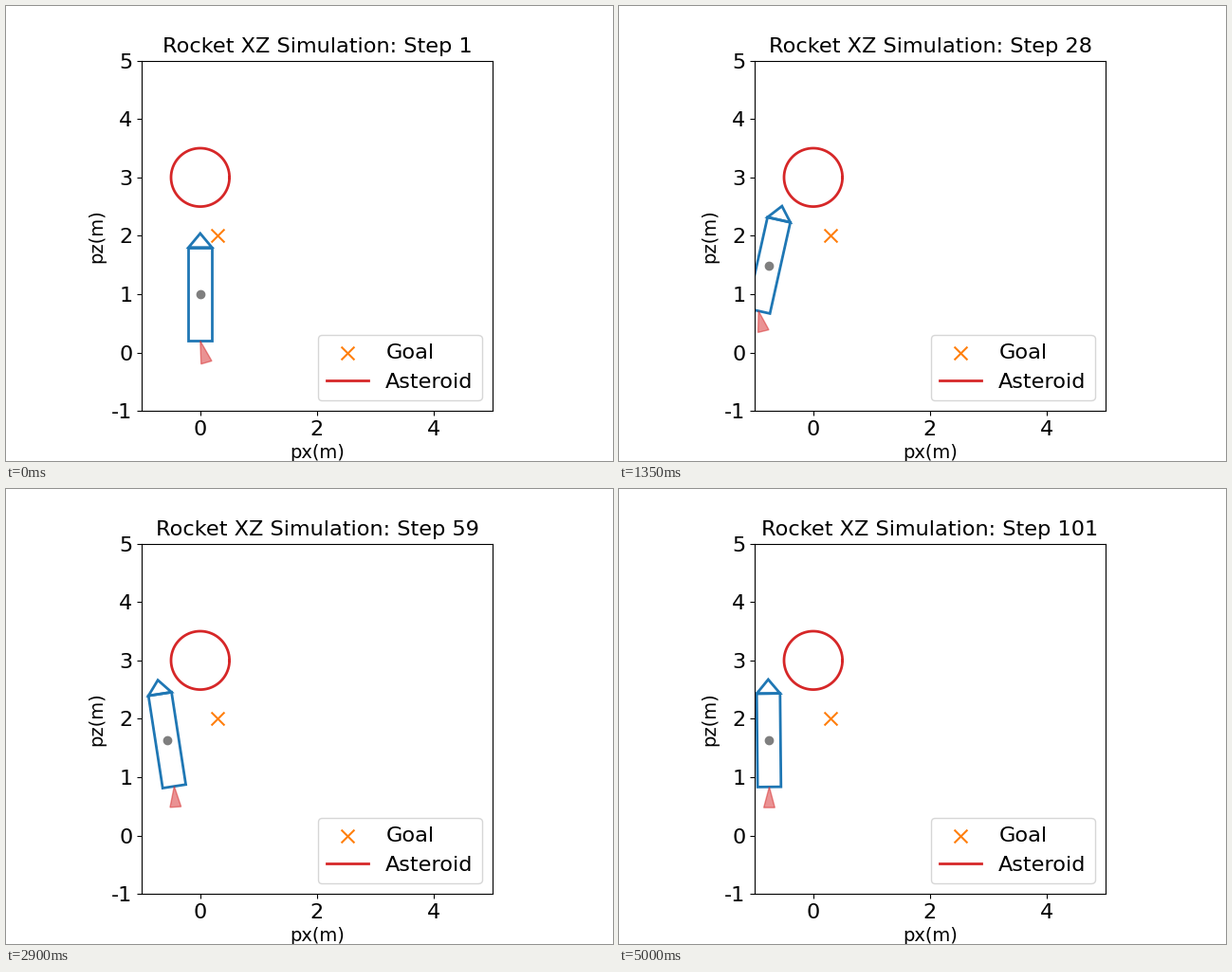
Animation, 640 px wide and 480 px high, one loop 5.05 s. Source, as a matplotlib script:

```python
import numpy as np
import matplotlib.pyplot as plt
from matplotlib.animation import FuncAnimation
from matplotlib.patches import Polygon

STEPS = 101
BIG = 16.1
plt.rcParams["axes.unicode_minus"] = False

# Key poses: step, px, pz, body tilt, flame angle
POSES = np.array([
    (0, 0, 1, 0, .28),
    (9, -.17, 1.135, .2, .13),
    (27, -.762, 1.493, -.22, .24),
    (40, -.83, 1.664, -.168, .45),
    (58, -.567, 1.634, .153, .065),
    (82, -.79, 1.582, -.03, -.01),
    (100, -.76, 1.633, .01, 0),
])


def glide(knots, steps):
    """Natural cubic spline through all pose columns at once."""
    t, y = knots[:, 0], knots[:, 1:]
    n, h = len(t), np.diff(t)
    slope = np.diff(y, axis=0) / h[:, None]
    a, b = np.eye(n), np.zeros_like(y)
    for i in range(1, n - 1):
        a[i, i - 1:i + 2] = h[i - 1], 2 * (h[i - 1] + h[i]), h[i]
        b[i] = 6 * (slope[i] - slope[i - 1])
    m = np.linalg.solve(a, b)
    i = np.clip(np.searchsorted(t, steps, side="right") - 1, 0, n - 2)
    u, w = (steps - t[i])[:, None], h[i][:, None]
    return (y[i] + u * (slope[i] - w * (2 * m[i] + m[i + 1]) / 6)
            + u**2 * m[i] / 2 + u**3 * (m[i + 1] - m[i]) / (6 * w))


def place(points, angle, origin):
    """Rotate points counterclockwise and move them to origin."""
    c, s = np.cos(angle), np.sin(angle)
    return np.array(points) @ np.array([[c, s], [-s, c]]) + origin


path = glide(POSES, np.arange(STEPS))

HULL = [(-.2, -.8), (.2, -.8), (.2, .8), (-.2, .8)]
NOSE = [(-.2, .8), (.2, .8), (0, 1.04)]

fig, ax = plt.subplots(figsize=(6.4, 4.8), dpi=100)
ax.set_aspect("equal")
ax.set_xlim(-1, 5)
ax.set_ylim(-1, 5)
ax.set_xticks(range(0, 5, 2))
ax.set_yticks(range(-1, 6))
ax.tick_params(labelsize=BIG)
ax.set_xlabel("px(m)", fontsize=14)
ax.set_ylabel("pz(m)", fontsize=14)
title = ax.set_title("", fontsize=BIG)

ax.scatter(.3, 2, s=100, marker="x", color="tab:orange", label="Goal")
arc = np.linspace(0, 2 * np.pi, 100)
ax.plot(.5 * np.cos(arc), 3 + .5 * np.sin(arc), color="tab:red", lw=2,
        label="Asteroid")
ax.legend(loc="lower right", fontsize=BIG)

hull = ax.add_patch(Polygon(HULL, fill=False, ec="tab:blue", lw=2))
nose = ax.add_patch(Polygon(NOSE, fill=False, ec="tab:blue", lw=2))
flame = ax.add_patch(Polygon(NOSE, color="tab:red", alpha=.5, lw=1))
center = ax.scatter(0, 1, s=36, color="tab:gray", zorder=3)


def update(k):
    pos, (tilt, jet) = path[k, :2], path[k, 2:]
    hull.set_xy(place(HULL, tilt, pos))
    nose.set_xy(place(NOSE, tilt, pos))
    nozzle = place([(0, -.8)], tilt, pos)
    reach = .355 + .03 * np.exp(-k / 4)
    cone = [(0, 0), (-.095, -reach), (.095, -reach)]
    flame.set_xy(place(cone, jet, nozzle))
    center.set_offsets([pos])
    title.set_text(f"Rocket XZ Simulation: Step {k + 1}")
    return hull, nose, flame, center, title


anim = FuncAnimation(fig, update, frames=STEPS, interval=50, repeat=True)
plt.show()
```
